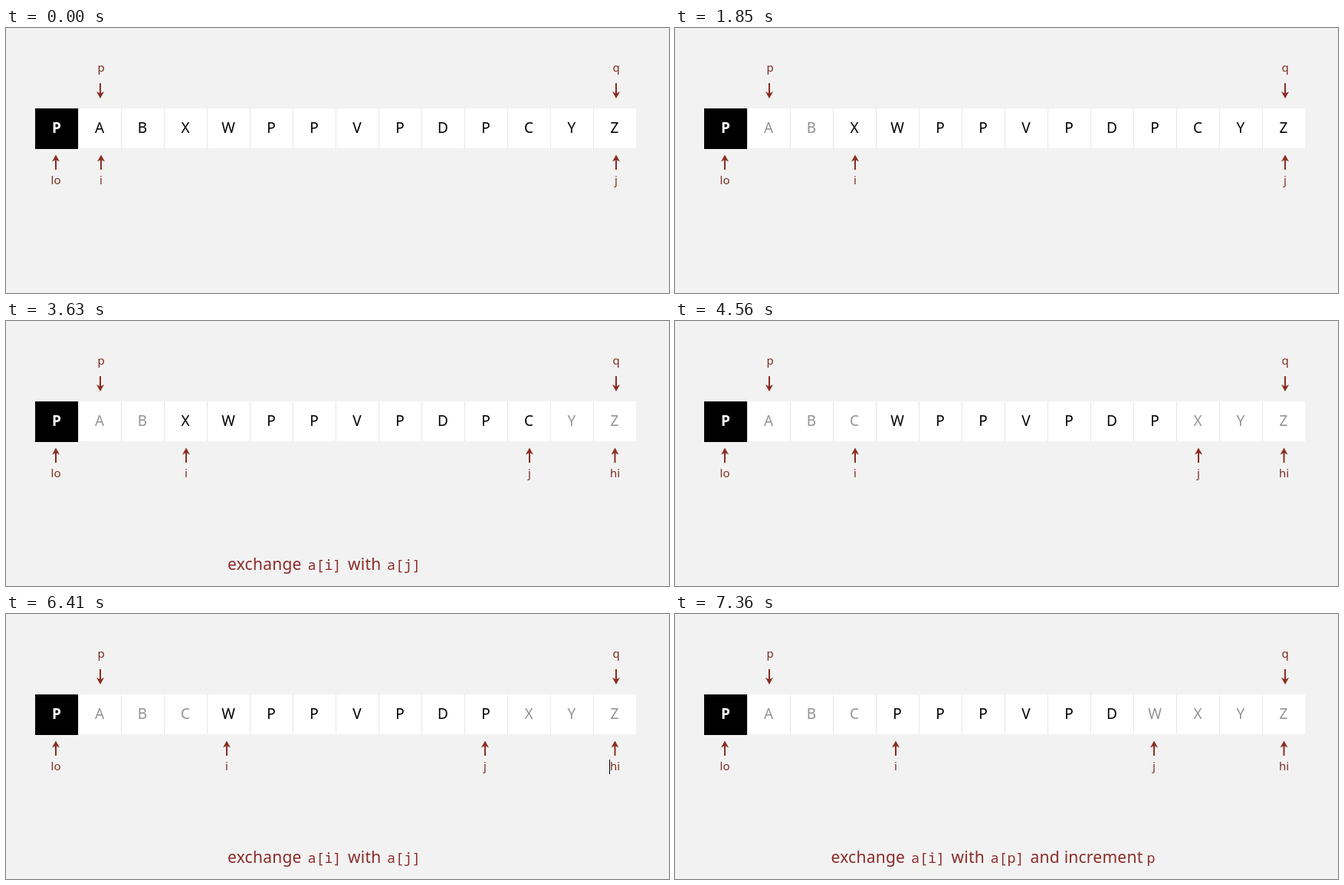
Animation of 865x346 px, one loop 8000 ms. Source, as an HTML page:

```html
<!DOCTYPE html>
<html lang="en">
<head>
<meta charset="utf-8">
<title>Three-way partitioning</title>
<style>
  html, body { margin: 0; width: 100%; height: 100%; overflow: hidden; background: #f2f2f2; }
  svg { display: block; width: 100vw; height: 100vh; }
  text { font-family: "Noto Sans", "Open Sans", sans-serif; }
  .cell text { font-size: 19px; text-anchor: middle; fill: #000; }
  .cell.done text { fill: #949494; }
  .cell.pivot text { fill: #fff; font-weight: 600; }
  .mark { fill: #8a2e20; }
  .mark text { font-size: 15px; text-anchor: middle; fill: #7c2c22; }
  .note text { font-size: 21px; letter-spacing: .25px; fill: #8a2d2a; }
  .note .code { font-family: "Noto Sans Mono", "DejaVu Sans Mono", monospace; font-size: 18.3px; letter-spacing: 0; }
</style>
</head>
<body>
<svg id="stage" viewBox="0 0 865 346">
  <rect x="38" y="105" width="784" height="52" fill="#fff"/>
  <rect x="38" y="105" width="56" height="53"/>
  <g id="cells"></g>
  <g id="marks"></g>
  <g class="note" id="swapJ">
    <text x="289" y="325">exchange</text>
    <text x="393.5" y="325" class="code">a[i]</text>
    <text x="446" y="325">with</text>
    <text x="497" y="325" class="code">a[j]</text>
  </g>
  <g class="note" id="swapP">
    <text x="203.5" y="325">exchange</text>
    <text x="308" y="325" class="code">a[i]</text>
    <text x="360.5" y="325">with</text>
    <text x="411.5" y="325" class="code">a[p]</text>
    <text x="463.5" y="325">and increment</text>
    <text x="615.5" y="325" class="code">p</text>
  </g>
  <rect id="caret" x="787" y="190" width="1" height="19"/>
</svg>
<script>
  const LOOP = 8000, CELL = 56, LEFT = 38;
  const $ = id => document.getElementById(id);

  function add(parent, tag, attrs, text = '') {
    const el = document.createElementNS('http://www.w3.org/2000/svg', tag);
    for (const k in attrs) el.setAttribute(k, attrs[k]);
    el.textContent = text;
    return parent.appendChild(el);
  }

  // Each step changes only what it names; lower case letters are already placed.
  const steps = [
    { at: 0, row: 'PABXWPPVPDPCYZ', i: 124, j: 796, hi: null, note: '', caret: false },
    { at: 1070, row: 'PaBXWPPVPDPCYZ', i: 178 },
    { at: 1850, row: 'PabXWPPVPDPCYZ', i: 235 },
    { at: 2790, row: 'PabXWPPVPDPCYz', j: 737.5, hi: 794.5 },
    { at: 3630, row: 'PabXWPPVPDPCyz', j: 683, note: 'swapJ' },
    { at: 4560, row: 'PabcWPPVPDPxyz', note: '' },
    { at: 5480, i: 288 },
    { at: 6410, j: 625, note: 'swapJ', caret: true },
    { at: 6490, caret: false },
    { at: 6960, caret: true },
    { at: 7360, row: 'PabcPPPVPDwxyz', note: 'swapP', caret: false }
  ];
  for (let n = 1; n < steps.length; n++) steps[n] = { ...steps[n - 1], ...steps[n] };

  const cells = [...steps[0].row].map((_, n) => {
    const x = LEFT + n * CELL;
    const g = add($('cells'), 'g', {});
    if (n) add(g, 'rect', { x, y: 105, width: 1, height: 52, fill: '#e7e7e7' });
    return { g, label: add(g, 'text', { x: x + CELL / 2, y: 137 }) };
  });

  const UP = 'M0 165.5L5 174.5L1 172.5V185H-1V172.5L-5 174.5Z';
  const DOWN = 'M0 92L5 83L1 85V72H-1V85L-5 83Z';

  function mark(name, x, above) {
    const g = add($('marks'), 'g', { class: 'mark', transform: `translate(${x})` });
    add(g, 'path', { d: above ? DOWN : UP });
    add(g, 'text', { x: above && name === 'p' ? 1 : 0, y: above ? 57 : 204 }, name);
    return g;
  }

  mark('p', 123, true);
  mark('q', 796, true);
  mark('lo', 65);
  const movers = { i: mark('i', 0), j: mark('j', 0), hi: mark('hi', 0) };

  const show = (el, on) => el.setAttribute('visibility', on ? 'visible' : 'hidden');

  function draw(s) {
    cells.forEach(({ g, label }, n) => {
      const c = s.row[n], up = c.toUpperCase();
      label.textContent = up;
      g.setAttribute('class', 'cell' + (n === 0 ? ' pivot' : c !== up ? ' done' : ''));
    });
    for (const k in movers) {
      show(movers[k], s[k] !== null);
      movers[k].setAttribute('transform', `translate(${s[k] || 0})`);
    }
    for (const id of ['swapJ', 'swapP']) show($(id), s.note === id);
    show($('caret'), s.caret);
  }

  let start, current;
  function tick(now) {
    start ??= now;
    const t = (now - start) % LOOP;
    const step = steps.findLast(s => s.at <= t);
    if (step !== current) draw(current = step);
    requestAnimationFrame(tick);
  }
  draw(current = steps[0]);
  requestAnimationFrame(tick);
</script>
</body>
</html>
```
